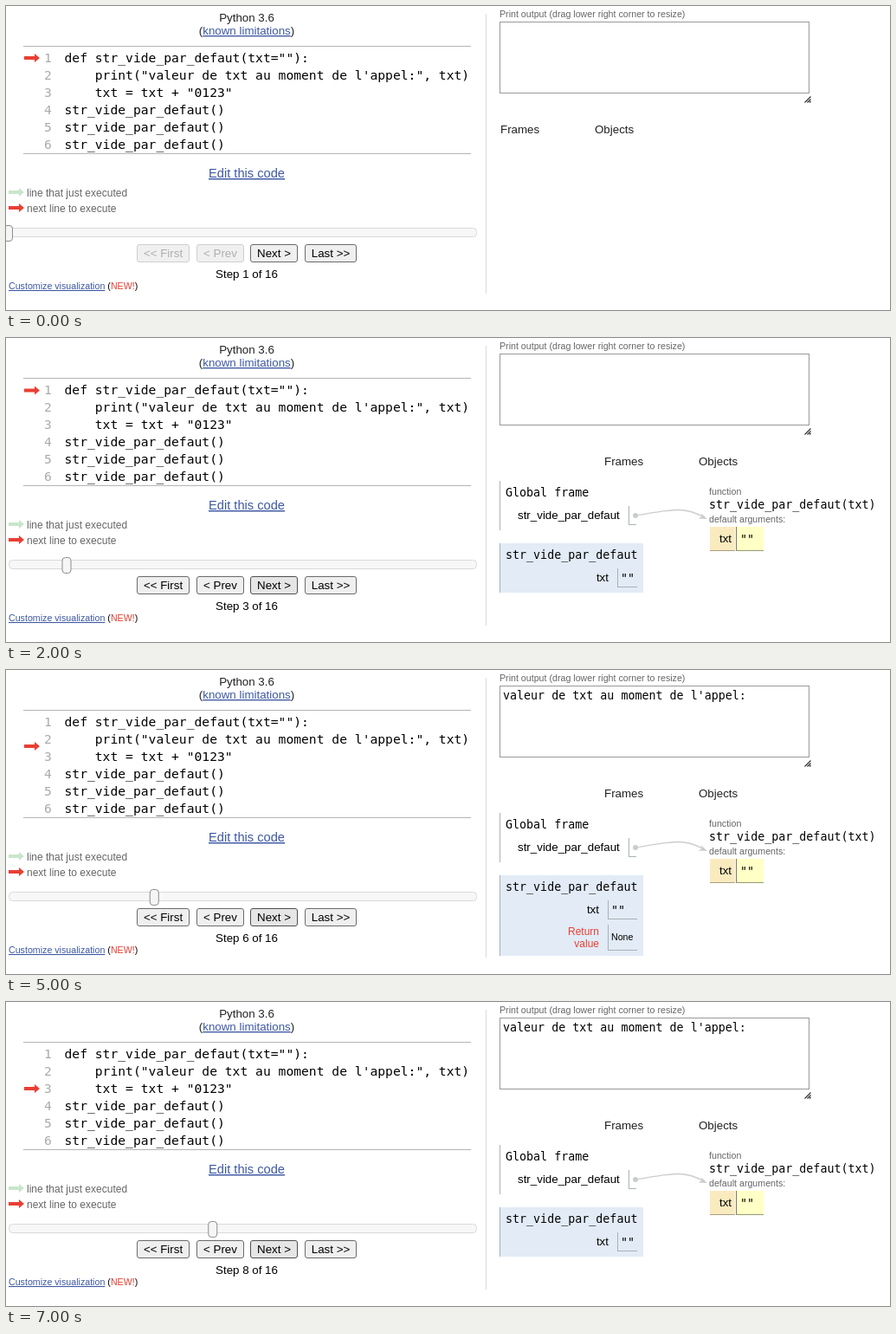
Recreate the animation shown at these times as an HTML page. Size 1021x351 px, loop 8 s.

```html
<!DOCTYPE html>
<html lang="en">
<head>
<meta charset="utf-8">
<title>Python step-through</title>
<style>
  html, body { margin: 0; width: 100%; height: 100%; overflow: hidden; background: #fff; }
  svg { display: block; }
  text { font: 13.333px "Liberation Sans", Arial, sans-serif; fill: #222; white-space: pre; }
  .mono { font-family: "DejaVu Sans Mono", monospace; fill: #000; }
  .code { font-size: 14.667px; }
  .num { fill: #aaa; }
  .small { font-size: 10.667px; fill: #666; }
  .legend { font-size: 12px; fill: #666; }
  .link { fill: #3d58a2; text-decoration: underline; }
  .edit { font-size: 14.667px; }
  .red { fill: #e93f34; }
  .black { fill: #000; }
  .off { fill: #aeaeae; }
  .mid { text-anchor: middle; }
  .end { text-anchor: end; }
</style>
</head>
<body>
<svg id="stage" width="1021" height="351" viewBox="0 0 1021 351"></svg>
<script>
const RED = '#e93f34', EDGE = '#a6b3b6';
const arrowY = [60, 60, 60.6, 61, 83.5, 88, 94, 100];

const text = (x, y, s, cls = '') => `<text x="${x}" y="${y}" class="${cls}">${s}</text>`;
const rect = (x, y, w, h, fill) => `<rect x="${x}" y="${y}" width="${w}" height="${h}" fill="${fill}"/>`;
const box = (x, y, w, h, fill, stroke, r = 0) =>
  `<rect x="${x + .5}" y="${y + .5}" width="${w - 1}" height="${h - 1}" rx="${r}" fill="${fill}" stroke="${stroke}"/>`;
const arrow = (x, y, fill) =>
  `<path transform="translate(${x} ${y - 5})" d="M0 3H12V0L18 5 12 10V7H0Z" fill="${fill}"/>`;
const cell = (x, y, w, h) => rect(x, y, 1, h, EDGE) + rect(x, y + h - 1, w, 1, EDGE);
const panel = (y, w, h, active) =>
  (active ? rect(570, y, w, h, '#e2ebf6') : '') + rect(570, y, 1, h, EDGE);

function button(x, w, label, state) {
  const [fill, stroke, cls] = {
    on: ['#efefef', '#6b6b6b', 'black'],
    hover: ['#e5e5e5', '#4f4f4f', 'black'],
    off: ['#f0f0f0', '#cfcfcf', 'off']
  }[state];
  return box(x, 275, w, 21, fill, stroke, 2.5) + text(x + w / 2, 290, label, 'mid ' + cls);
}

function codePane(step) {
  const lines = ['def str_vide_par_defaut(txt=""):',
    '    print("valeur de txt au moment de l\'appel:", txt)',
    '    txt = txt + "0123"',
    ...Array(3).fill('str_vide_par_defaut()')];
  const back = step ? 'on' : 'off';
  return text(278, 18, 'Python 3.6', 'mid')
    + text(278, 33, '(<tspan class="link">known limitations</tspan>)', 'mid')
    + rect(20, 46, 517, 1, '#b4b4b4') + rect(20, 170, 517, 1, '#b4b4b4')
    + lines.map((s, i) => text(44, 65 + 20 * i, i + 1, 'mono code num')
      + text(67.5, 65 + 20 * i, s, 'mono code')).join('')
    + arrow(21, arrowY[step], RED)
    + text(278, 198, 'Edit this code', 'mid edit link')
    + arrow(3, 215, '#c9e6ca') + text(24, 220, 'line that just executed', 'legend')
    + arrow(3, 233, RED) + text(24, 238, 'next line to execute', 'legend')
    + box(3, 256, 541, 11, '#f7f7f7', '#dadada', 4)
    + box(-3 + 33.75 * step, 253, 11, 19, '#f6f6f6', '#8c8c8c', 3.5)
    + button(151, 61, '&lt;&lt; First', back) + button(220, 55, '&lt; Prev', back)
    + button(282, 55, 'Next &gt;', step ? 'hover' : 'on') + button(345, 60, 'Last &gt;&gt;', 'on')
    + text(278, 314, `Step ${step + 1} of 16`, 'mid black')
    + text(3, 327, '<tspan class="link">Customize visualization</tspan> <tspan class="black">(</tspan>'
      + '<tspan class="red">NEW!</tspan><tspan class="black">)</tspan>', 'small');
}

function outputPane(step) {
  return rect(554, 9, 1, 323, '#dcdcdc')
    + text(570, 13, 'Print output (drag lower right corner to resize)', 'small')
    + box(570, 18, 358, 83, '#fff', '#999')
    + '<path d="M922.5 111.5L929.5 104.5M925.5 111.5L929.5 107.5M928 111.5L929.5 110" stroke="#333" stroke-width="1.2"/>'
    + (step > 3 ? text(574, 34, "valeur de txt au moment de l'appel:", 'mono') : '');
}

// The global frame and the function object, both moved right while a call is open.
function globals(dx, active) {
  const wire = active ? '#005583' : '#ccc';
  return panel(165, 155, 57, active)
    + text(577, 183, 'Global frame', 'mono')
    + `<g transform="translate(${dx})">`
    + text(580, 209, 'str_vide_par_defaut', 'black')
    + cell(708, 194, 9, 22)
    + text(801, 181, 'function', 'small')
    + text(801, 197, 'str_vide_par_defaut(txt)', 'mono')
    + text(801, 213, 'default arguments:', 'small')
    + rect(802, 218, 29, 28, '#faebbf') + rect(833, 218, 31, 28, '#ffffc6')
    + rect(832, 218, 1, 28, '#777') + rect(802, 245, 29, 1, '#a99e80') + rect(832, 245, 32, 1, '#999970')
    + text(813, 236, 'txt', 'black') + text(837, 237, '""', 'mono')
    + `<path d="M716 205C760 198 772 194 795 207" fill="none" stroke="${wire}" stroke-width="1.3"/>`
    + `<circle cx="716" cy="205" r="3" fill="${wire}"/>`
    + `<path d="M799 209L791.500 202 793 206 788.500 208.500Z" fill="${wire}"/></g>`;
}

function callFrame(returning) {
  const x = returning ? 695 : 706;
  return panel(237, 166, returning ? 93 : 57, true)
    + text(577, 255, 'str_vide_par_defaut', 'mono')
    + text(x - 10, 281, 'txt', 'end black') + cell(x, 266, 729 - x, 22)
    + text(x + 4, 282, '""', 'mono')
    + (returning ? text(x - 10, 306, 'Return', 'end legend red') + text(x - 10, 320, 'value', 'end legend red')
      + cell(x, 294, 729 - x, 30) + text(x + 4, 312, 'None', 'small black') : '');
}

function heapPane(step) {
  const inCall = step > 1 && step !== 6, dx = inCall ? 11 : 0;
  return text(step ? 680 + dx : 571, 147, 'Frames')
    + text(step ? 789 + dx : 680, 147, 'Objects')
    + (step ? globals(dx, !inCall) : '')
    + (inCall ? callFrame(step === 5) : '');
}

const stage = document.getElementById('stage');
let shown = -1;
function draw() {
  const step = Math.floor(performance.now() % 8000 / 1000);
  if (step !== shown) {
    stage.innerHTML = codePane(step) + outputPane(step) + heapPane(step);
    shown = step;
  }
  requestAnimationFrame(draw);
}
draw();
</script>
</body>
</html>
```
